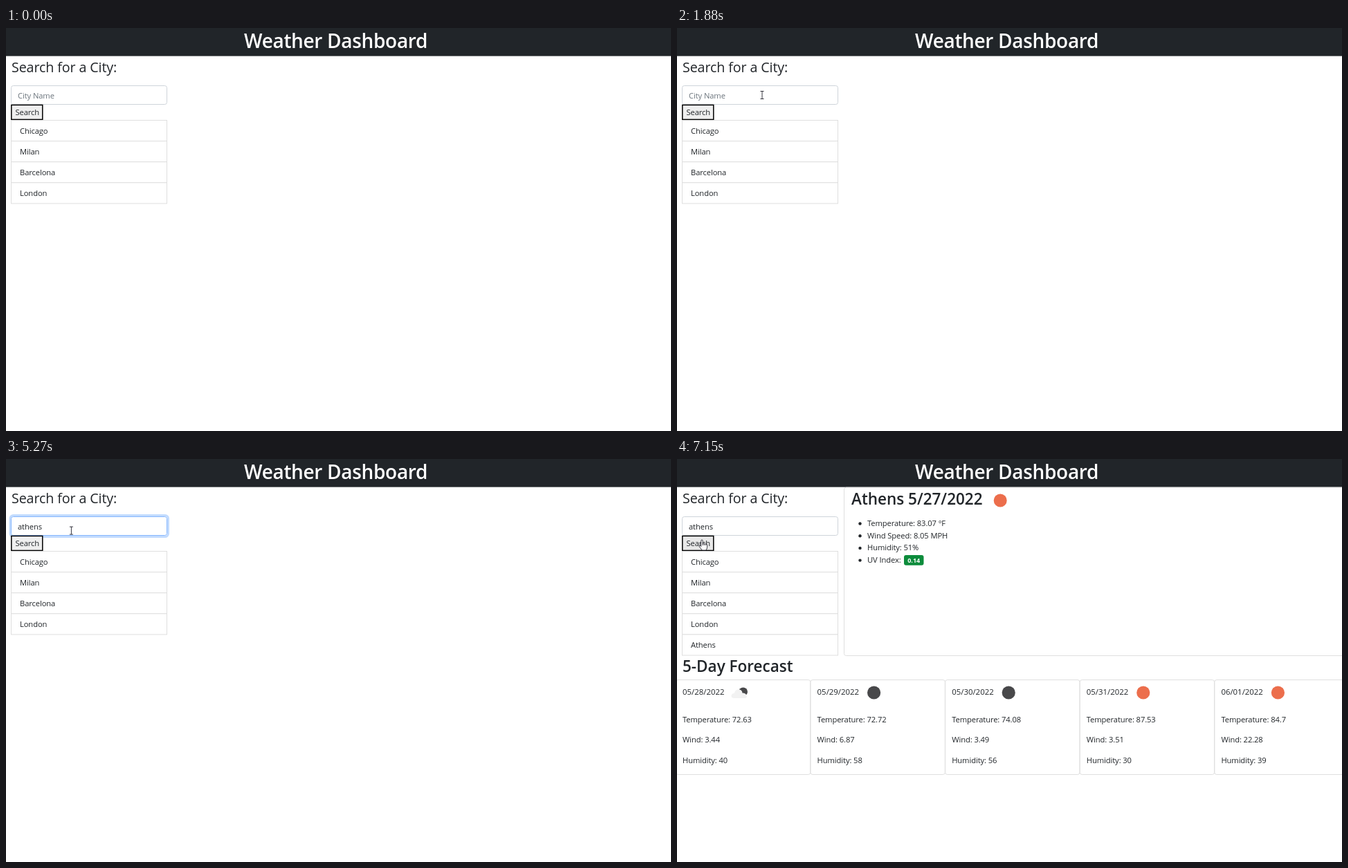
Animation, 961 px wide and 583 px high, one loop 8 s. Source, as an HTML page:

```html
<!DOCTYPE html>
<html lang="en">
<head>
<meta charset="utf-8">
<title>Weather Dashboard</title>
<style>
  html, body { margin: 0; width: 100%; height: 100%; overflow: hidden; background: #fff; }
  svg { display: block; font: 11.2px "Open Sans", "Noto Sans", sans-serif; letter-spacing: -.1px; fill: #212529; }
  .title { font-size: 28px; font-weight: 600; letter-spacing: -.32px; fill: #fff; text-anchor: middle; }
  .heading { font-size: 22.5px; font-weight: 600; letter-spacing: 0; }
  .search { font-size: 19.7px; letter-spacing: -.12px; }
  .date { font-size: 11.4px; letter-spacing: 0; }
  .badge { font-size: 9px; font-weight: 700; letter-spacing: 0; fill: #fff; text-anchor: middle; }
  .box { fill: #fff; stroke: #dfdfdf; }
  .cursor { fill: #fff; stroke: #22222c; stroke-width: .9; stroke-linejoin: round; }
  .hidden { display: none; }
</style>
</head>
<body>
<svg width="961" height="583" viewBox="0 0 961 583">
  <rect width="961" height="40.6" fill="#212529"/>
  <text class="title" x="476.6" y="28.6">Weather Dashboard</text>
  <text class="search" x="8" y="64">Search for a City:</text>

  <rect id="ring" x="6" y="81.5" width="228.5" height="31" rx="4.5" fill="none" stroke="#c2dbfe" stroke-width="3"/>
  <rect class="box" id="field" x="7.5" y="83.5" width="225" height="27" rx="3"/>
  <text id="entry" x="17" y="101.5"></text>
  <path id="caret" d="M0 90V104" stroke="#111"/>

  <rect id="button" x="7.8" y="111.4" width="45" height="21" stroke="#000" stroke-width="1.5"/>
  <text x="13.5" y="126">Search</text>
  <g id="cities"></g>

  <g id="today">
    <rect class="box" x="241.5" y="41.2" width="730" height="243.3" rx="3"/>
    <text class="heading" x="252" y="66">Athens 5/27/2022</text>
    <circle cx="467.2" cy="60" r="9.5" fill="#ec6e4c"/>
    <g id="facts"></g>
    <text class="heading" x="8" y="308">5-Day Forecast</text>
  </g>
  <g id="forecast"></g>

  <circle id="halo" r="7.5" fill="#fff000" opacity=".75"/>
  <g id="pointer">
    <path class="cursor" id="arrow" d="M0 0V11.5L2.7 9 4.4 13 6.2 12.2 4.5 8.3H8.2Z"/>
    <path class="cursor" id="hand" d="M-1.2 9.5V1.3Q-1.2 0 0 0T1.2 1.3V5.5Q2.2 4.4 3.4 5.7 4.6 4.8 5.7 6.2 7.6 5.6 7.6 7.5V10.5Q7.4 13 6 15H.2Q-1 13-3.8 9.8-4.4 8.4-3 8.2-2 8.3-1.2 9.5ZM1.2 5.5V8M3.4 5.7V8M5.7 6.2V8"/>
    <path class="cursor" id="beam" d="M-2.5-5.5H2.5M0-5.5V5.5M-2.5 5.5H2.5"/>
  </g>
</svg>
<script>
const $ = id => document.getElementById(id);
const show = (id, on) => $(id).classList.toggle('hidden', !on);
const text = (x, y, s, cls = '') => `<text class="${cls}" x="${x}" y="${Math.round(y)}">${s}</text>`;

$('cities').innerHTML = ['Chicago', 'Milan', 'Barcelona', 'London', 'Athens'].map((name, i) =>
  `<g id="city${i}"><rect class="box" x="7.5" y="${133.5 + i * 30.1}" width="225" height="30.1"/>
  ${text(20, 153 + i * 30.1, name)}</g>`).join('');

$('facts').innerHTML = ['Temperature: 83.07 °F', 'Wind Speed: 8.05 MPH', 'Humidity: 51%', 'UV Index:'].map((s, i) =>
  `<g id="fact${i}"><circle cx="264.5" cy="${93.5 + i * 17.7}" r="2.2"/>${text(275, 97 + i * 17.7, s)}</g>`).join('');
$('fact3').innerHTML += `<rect x="328" y="139" width="28.5" height="14.7" rx="3" fill="#0d8c3c"/>
  ${text(342.2, 150, '0.14', 'badge')}`;

const days = [
  ['05/28/2022', 72.63, 3.44, 40],
  ['05/29/2022', 72.72, 6.87, 58, '#48484a'],
  ['05/30/2022', 74.08, 3.49, 56, '#48484a'],
  ['05/31/2022', 87.53, 3.51, 30, '#ec6e4c'],
  ['06/01/2022', 84.7, 22.28, 39, '#ec6e4c']
];
const cloud = `<g id="cloud"><circle cx="95.6" cy="336.8" r="6.4" fill="#48484a"/>
  <path d="M82 346Q78.500 345.500 78.500 342.500T83 338.500Q84 333.500 89 333.500T94.500 338.500Q99 338 100.500 342T98 346Z" fill="#f2f2f2"/></g>`;
$('forecast').innerHTML = days.map(([date, temp, wind, humidity, color], i) =>
  `<g transform="translate(${i * 194.6})">
    <rect class="box" x="-1.5" y="319.5" width="194.2" height="137" rx="3"/>
    <g id="date${i}">${text(8, 341, date, 'date')}</g>
    ${color ? `<circle cx="90" cy="338" r="9.6" fill="${color}"/>` : cloud}
    <g id="details${i}">${text(8, 381, 'Temperature: ' + temp)}
      ${text(8, 410.4, 'Wind: ' + wind)}${text(8, 439.8, 'Humidity: ' + humidity)}</g>
  </g>`).join('');

const clamp = v => Math.min(1, Math.max(0, v));
const within = (t, a, b) => t >= a && t < b;
const keyTimes = [3070, 3400, 3660, 3930, 4130, 4330];

// Pointer strokes: start, end, from, to, easing
const strokes = [
  [280, 1040, [915, 574], [274, 175], u => 1.55 * u - .55 * u * u],
  [1040, 1880, [274, 175], [123, 97], u => 1 - (1 - u) ** 2.1],
  [5060, 5610, [123, 97], [36, 117], u => u * u * (3 - 2 * u)]
];

function pointerAt(t) {
  const [start, end, from, to, ease] = strokes.filter(s => t >= s[0]).pop() || strokes[0];
  const k = ease(clamp((t - start) / (end - start)));
  return from.map((v, i) => v + (to[i] - v) * k);
}

function render(t) {
  const [x, y] = pointerAt(t);
  const inColumn = x > 8 && x < 233;
  const overField = inColumn && y > 83 && y < 111;
  const overButton = x > 7 && x < 54 && y >= 111 && y < 133;
  const overCity = inColumn && y >= 133 && y < 163;
  show('pointer', t >= 280);
  $('pointer').setAttribute('transform', `translate(${x} ${y})`);
  show('beam', overField);
  show('hand', overButton || overCity);
  show('arrow', !overField && !overButton && !overCity);

  const [cityBox, cityName] = $('city0').children;
  cityBox.style.fill = overCity ? '#f8f9fa' : '#fff';
  cityName.style.fill = overCity ? '#495057' : '#212529';
  $('button').style.fill = overButton ? '#e8e8e8' : '#efefef';

  const focus = clamp((t - 2040) / 150) * clamp((5990 - t) / 150);
  $('ring').style.opacity = focus;
  $('field').style.stroke = focus > .3 ? '#86b7fe' : '#ced4da';

  const typed = 'athens'.slice(0, keyTimes.filter(k => t >= k).length);
  const entry = $('entry');
  const content = typed || 'City Name';
  if (entry.textContent !== content) entry.textContent = content;
  entry.style.fill = typed ? '#212529' : '#6c757d';
  const caretX = 17.5 + (typed ? entry.getComputedTextLength() : 0);
  $('caret').setAttribute('transform', `translate(${Math.floor(caretX) + .5})`);
  show('caret', within(t, 2080, 2610) || within(t, 3070, 4860) || within(t, 5390, 5880));

  show('halo', within(t, 2080, 2220) || within(t, 5880, 6020));
  $('halo').setAttribute('transform', `translate(${x} ${y + 1})`);

  show('today', t >= 6150);
  show('city4', t >= 6150);
  show('fact3', t >= 6480);
  show('forecast', t >= 6550);

  // The first card sits higher until its icon arrives
  const loaded = t >= 7150;
  show('cloud', loaded);
  $('date0').setAttribute('transform', `translate(0 ${loaded ? 0 : -8})`);
  $('details0').setAttribute('transform', `translate(0 ${loaded ? 0 : -19})`);
}

function tick() {
  render(performance.now() % 8000);
  requestAnimationFrame(tick);
}
tick();
</script>
</body>
</html>
```
